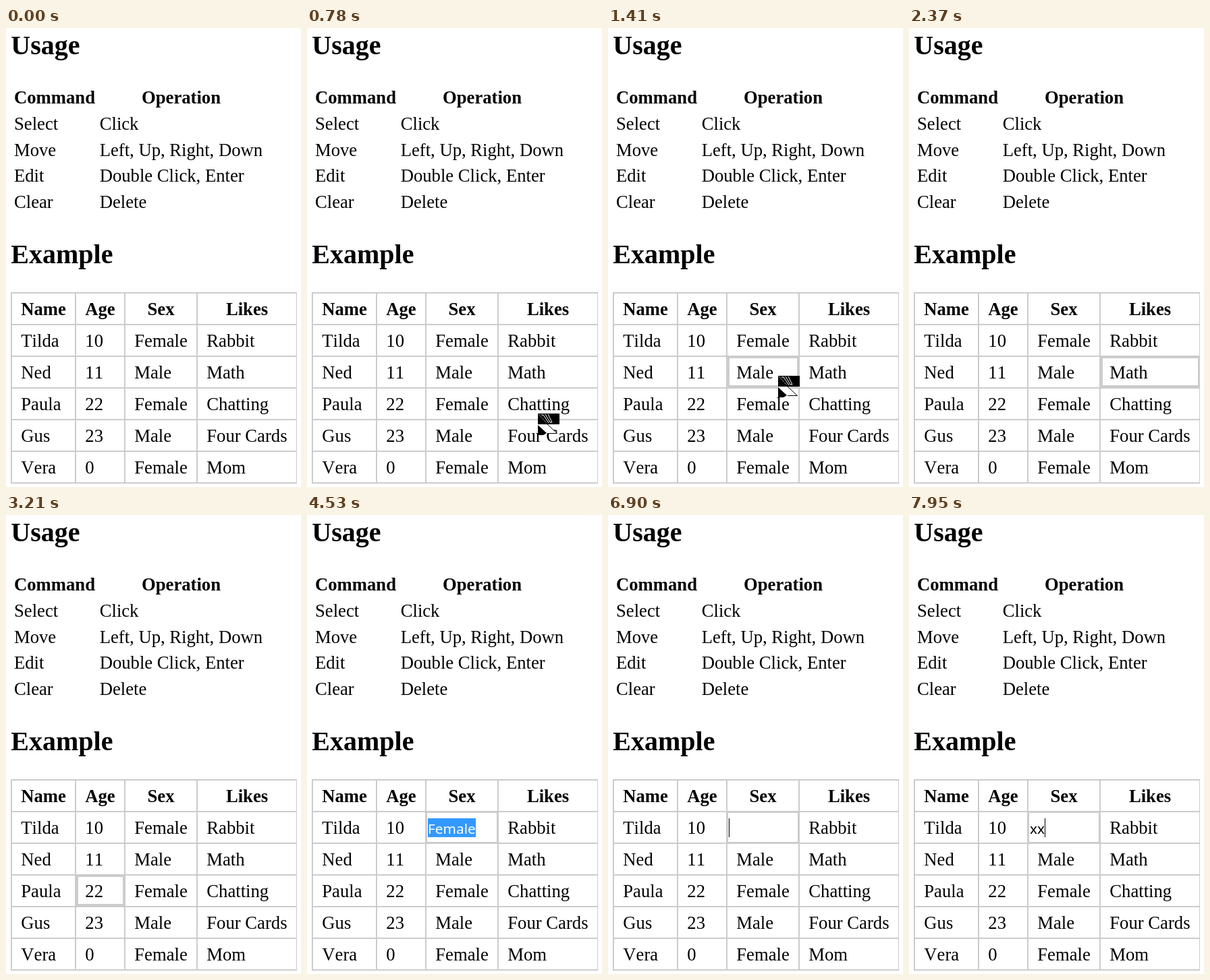
These frames come from a looping animation (437x681 px, 8 s). An HTML page with a canvas:

```html
<!DOCTYPE html>
<html lang="en">
<head>
<meta charset="utf-8">
<title>Editable table</title>
<style>
  html, body { margin: 0; width: 100%; height: 100%; overflow: hidden; background: #fff; }
  canvas { display: block; width: 437px; height: 681px; }
</style>
</head>
<body>
<canvas id="stage" width="437" height="681"></canvas>
<script>
const ctx = document.getElementById('stage').getContext('2d');
const LOOP = 8000, STEP = 30;
const SERIF = '"Liberation Serif", "Times New Roman", serif';
const BODY = `26.667px ${SERIF}`;
const BOLD = `bold ${BODY}`;
const HEADING = `bold 40px ${SERIF}`;
const FIELD = '20.8px "Noto Sans", "Open Sans", sans-serif';
const GREY = '#ccc';

const usage = [
  ['Select', 'Click'],
  ['Move', 'Left, Up, Right, Down'],
  ['Edit', 'Double Click, Enter'],
  ['Clear', 'Delete']
];
const people = [
  ['Name', 'Age', 'Sex', 'Likes'],
  ['Tilda', '10', 'Female', 'Rabbit'],
  ['Ned', '11', 'Male', 'Math'],
  ['Paula', '22', 'Female', 'Chatting'],
  ['Gus', '23', 'Male', 'Four Cards'],
  ['Vera', '0', 'Female', 'Mom']
];

// Grid lines are 2px wide and start at these positions; the table is cut off at RIGHT.
const lineX = [7, 102, 175, 282, 430], RIGHT = 431;
const lineY = i => 392 + 47 * i;

// [time, row, column]
const moves = [
  [1410, 2, 2], [2370, 2, 3], [2670, 3, 3], [2970, 3, 2],
  [3210, 3, 1], [3450, 2, 1], [3690, 1, 1], [3930, 1, 2]
];
// [time, text, caret shown, text selected]
const edits = [
  [4530, 'Female', false, true],
  [5880, 'x', true], [6030, 'xx', true], [6210, 'xxx', true],
  [6720, 'xxx', false], [6900, '', true], [7440, '', false],
  [7770, 'x', true], [7950, 'xx', true]
];

const latest = (list, t) => list.filter(item => item[0] <= t).pop();

function fill(color, x, y, w, h) {
  ctx.fillStyle = color;
  ctx.fillRect(x, y, w, h);
}

function text(str, x, y, font, color = '#000', align = 'left') {
  ctx.font = font;
  ctx.fillStyle = color;
  ctx.textAlign = align;
  ctx.fillText(str, x, y);
}

function path(points, color, stroke) {
  ctx.beginPath();
  points.forEach(([x, y]) => ctx.lineTo(x, y));
  ctx[stroke ? 'strokeStyle' : 'fillStyle'] = color;
  if (stroke) ctx.stroke();
  else ctx.fill();
}

function cellBox(row, col) {
  const x = lineX[col] + 2, y = lineY(row) + 2;
  return { x, y, w: lineX[col + 1] - x, h: 45 };
}

// Inner frame of a cell; the left and bottom sides may be thicker.
function frame({ x, y, w, h }, thin, thick) {
  fill(GREY, x, y, w, thin);
  fill(GREY, x + w - thin, y, thin, h);
  fill(GREY, x, y, thick, h);
  fill(GREY, x, y + h - thick, w, thick);
}

function drawUsage() {
  text('Usage', 7.3, 39, HEADING);
  text('Command', 12, 112, BOLD);
  text('Operation', 259.5, 112, BOLD, '#000', 'center');
  usage.forEach(([name, keys], i) => {
    const y = Math.round(112.3 + 38.67 * (i + 1));
    text(name, 12, y, BODY);
    text(keys, 138.7, y, BODY);
  });
}

function drawTable(editing) {
  text('Example', 7.3, 349, HEADING);
  for (let i = 0; i < 7; i++) fill(GREY, 7, lineY(i), RIGHT - 7, 2);
  lineX.forEach(x => fill(GREY, x, 392, Math.min(2, RIGHT - x), 284));
  people.forEach((row, r) => row.forEach((value, c) => {
    if (editing && r === 1 && c === 2) return;
    const { x, w } = cellBox(r, c), y = 426 + 47 * r;
    if (r) text(value, x + 13.3, y, BODY);
    else text(value, x + w / 2, y, BOLD, '#000', 'center');
  }));
}

function drawField([, value, caret, selected]) {
  frame(cellBox(1, 2), 1, 1);
  if (selected) fill('#39f', 179, 450, 71, 28);
  text(value, 179, 473, FIELD, selected ? '#fff' : '#000');
  if (caret) fill('#000', 179 + 11 * value.length, 450, 1, 28);
}

function pointerAt(t) {
  if (t < 690 || t >= 1740) return null;
  if (t >= 1710) return [317, 485];
  const step = Math.floor((t - 690) / STEP) * STEP;
  const left = 1 - Math.min(1, step / 570);
  return [Math.round(252 + 173 * left ** 3.8), Math.round(516 + 81 * left ** 2.1)];
}

function drawPointer([x, y]) {
  ctx.save();
  ctx.translate(x, y);
  fill('#000', 0, 0, 32, 16);
  path([[0, 16], [15, 16], [29, 30], [14, 30]], '#fff');
  path([[0, 17], [0, 32], [8, 32], [13, 29]], '#000');
  path([[14, 16], [28.5, 29.5], [14, 29.5]], '#000', true);
  ctx.setLineDash([1, 1]);
  path([[1, 1], [13, 14]], '#fff', true);
  ctx.setLineDash([]);
  path([[5, 2], [8, 2], [16, 14]], '#fff', true);
  path([[11, 1], [18, 13], [21, 13], [15, 1]], '#fff', true);
  ctx.restore();
}

function draw(t) {
  const edit = latest(edits, t), move = latest(moves, t), pointer = pointerAt(t);
  fill('#fff', 0, 0, 437, 681);
  drawUsage();
  drawTable(edit);
  if (edit) drawField(edit);
  else if (move) frame(cellBox(move[1], move[2]), 2, 3);
  if (pointer) drawPointer(pointer);
}

ctx.fontKerning = 'none';
const start = performance.now();
function tick() {
  draw((performance.now() - start) % LOOP);
  requestAnimationFrame(tick);
}
tick();
</script>
</body>
</html>
```
